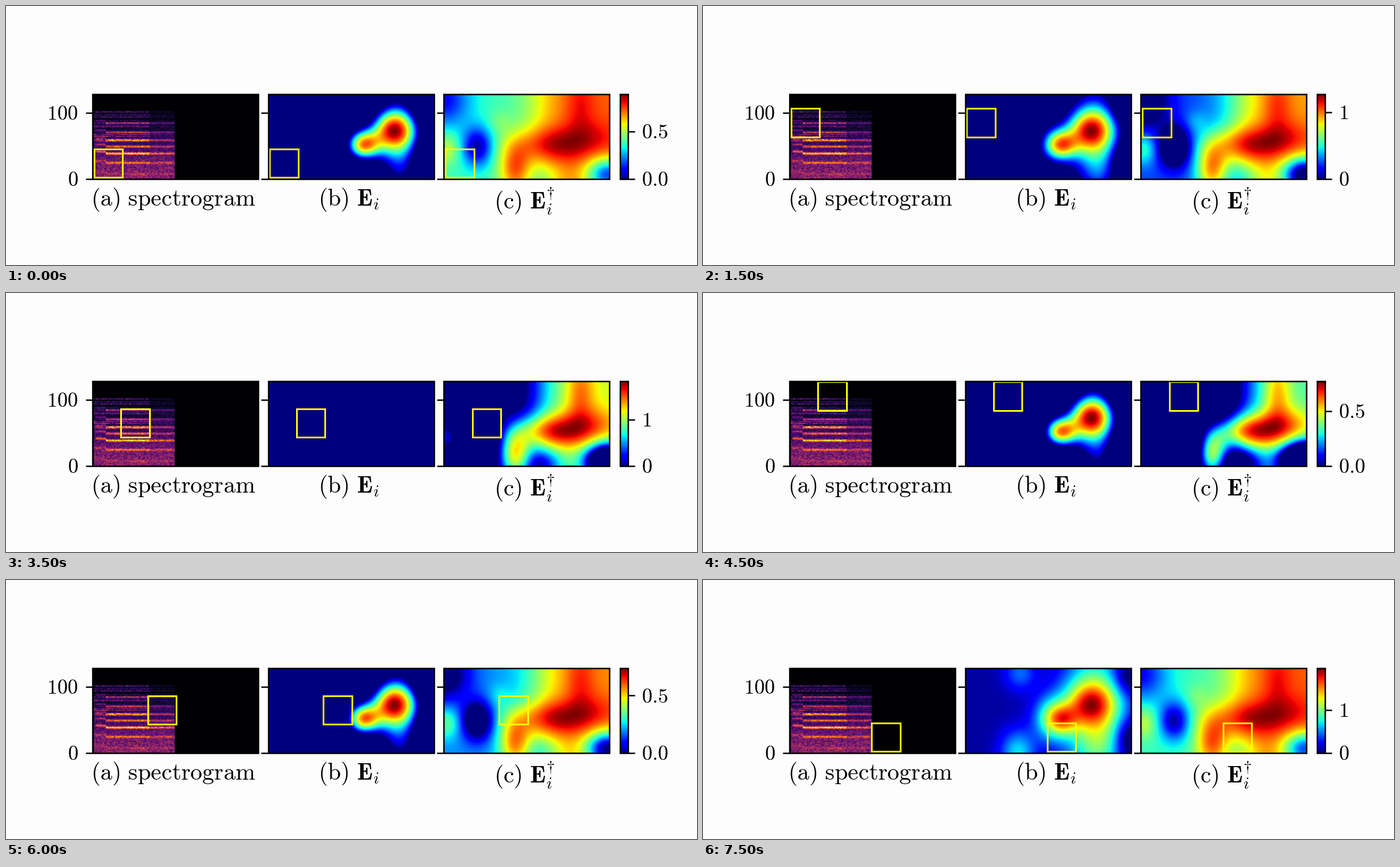
Recreate the animation shown at these times as a matplotlib script. Size 1222 by 458 pixels, loop 8000 ms.

```python
import matplotlib.pyplot as plt
import numpy as np
from matplotlib.animation import FuncAnimation
from matplotlib.patches import Rectangle

W, H, DPI = 1222, 458, 64
PT = 72 / DPI  # points per pixel
PW, PH = 293, 150
TOP, BOTTOM = 156, 306
LEFTS = [153 + 310.7 * i for i in range(3)]
BAR = (1085.5, 1100)
ROWS, STEPS = 5, 16
DROP = 12.4  # from tick to text baseline

plt.rcParams["mathtext.fontset"] = "cm"

# Key steps: step, colour bar maximum, cut-off in map b, cut-off in map c
KEYS = np.array([
    (0, .893, .5, 0), (3, 1.27, .36, .28), (4, .85, .5, .45), (5, .9, .5, 0),
    (7, 1.83, 1, .53), (8, .85, .52, .6), (9, .773, .52, .66),
    (11, .758, .5, 0), (14, .7, .5, .62), (15, 1.97, 0, 0),
]).T


def bumps(x, y, *specs):
    """Sum of Gaussian bumps (centre x, y, widths x, y, height)."""
    return sum(h * np.exp(-((x - cx) / sx) ** 2 / 2 - ((y - cy) / sy) ** 2 / 2)
               for cx, cy, sx, sy, h in specs)


def relevance():
    x, y = np.meshgrid(np.arange(PW), np.arange(PH))
    b = .03 + bumps(
        x, y,
        (228, 80, 40, 80, .55),    # wide halo
        (219, 62, 30, 26, .45),    # main lobe
        (171, 90, 19, 18, .4),     # second lobe
        (150, 88, 22, 28, .36),    # its left shoulder
        (238, 145, 22, 30, .08),
        (288, 125, 18, 25, -.25), (284, 15, 18, 22, -.2),
        (92, 148, 22, 28, .32), (96, 8, 20, 22, .2))
    c = .42 + .4 / (1 + np.exp((165 - x) / 22)) + bumps(
        x, y,
        (0, 10, 32, 34, -.3),      # cold corner
        (59, 92, 19, 24, -.4),     # cold spot
        (5, 96, 17, 20, .17),
        (125, 132, 20, 32, .36),   # lower ridge
        (180, 88, 50, 22, .24), (262, 74, 35, 22, .07),
        (175, 148, 26, 20, -.12), (289, 142, 27, 21, -.62),
        (240, 20, 18, 40, .1), (97, 48, 14, 14, .06))
    return [np.clip(f / f.max(), 0, 1) for f in (b, c)]


def spectrogram():
    rng = np.random.default_rng(4)
    r, c = np.arange(128)[:, None], np.arange(250)[None, :]
    noise = rng.random((128, 250))
    noise = (noise + np.roll(noise, 1, axis=1)) / 2
    img = .4 * np.exp(-(r / 62) ** 2) * (.35 + 1.1 * noise)
    img += .42 * rng.random((128, 1)) ** 3 * (r > 55) * noise * np.where(c < 86, 1.6, .5)
    harmonics = [(7, .15), (24, .42), (38, .75), (48.5, .55), (58, .48), (70, .4), (84, .3)]
    for start, end, shift, gain in [(4, 20, 3, .5), (20, 86, 0, 1), (86, 124, 0, .62)]:
        inside = (c >= start) & (c < end)
        for row, amp in harmonics:
            line = np.exp(-((r - row - shift) / 1.6) ** 2)
            img += gain * amp * line * inside * (.75 + .5 * noise)
    return np.clip(img, 0, 1) * (r < 104) * (c >= 2) * (c < 124)


def cut(field, t):
    return np.clip((field - t) / max(1 - t, 1e-6), 0, 1)


def picture(data, left, right, cmap, origin="upper"):
    return ax.imshow(data, cmap=cmap, vmin=0, vmax=1, origin=origin, aspect="auto",
                     extent=(left, right, BOTTOM, TOP), interpolation="bilinear")


def outline(x, y, w, h, color, lw, z):
    return ax.add_patch(Rectangle((x, y), w, h, fill=False, ec=color, lw=lw * PT, zorder=z))


def tick(x, y):
    return ax.plot([x, x + 12], [y, y], color="black", lw=2.5 * PT,
                   solid_capstyle="butt", zorder=5)[0]


def label(x, y, tex, size=36.5, ha="left"):
    return ax.text(x, y, f"${tex}$", fontsize=size * PT, ha=ha, va="baseline")


fig = plt.figure(figsize=(W / DPI, H / DPI), dpi=DPI, facecolor="#fdfdfd")
ax = fig.add_axes([0, 0, 1, 1])

fields = relevance()
picture(spectrogram(), LEFTS[0], LEFTS[0] + PW, "inferno", "lower")
maps = [picture(f, x, x + PW, "jet") for f, x in zip(fields, LEFTS[1:])]
picture(np.linspace(0, 1, 256)[:, None], *BAR, "jet", "lower")

boxes = []
for left in LEFTS:
    outline(left, TOP, PW, PH, "black", 2.6, 5)
    for y in (188.5, BOTTOM):
        tick(left - 12.5, y)
    boxes.append(outline(left, TOP, 50.5, 50.5, "yellow", 3, 4))
outline(BAR[0], TOP, BAR[1] - BAR[0], PH, "black", 2.6, 5)

label(127.5, 188.5 + DROP, "100", ha="right")
label(127.5, BOTTOM + DROP, "0", ha="right")
tick(BAR[1], BOTTOM)
zero = label(1123.5, BOTTOM + DROP, "0")
mark_tick = tick(BAR[1], TOP)
mark = label(1123.5, TOP, "1")

captions = [
    (150, 352.5, r"\mathrm{(a)\ spectrogram}"),
    (552, 352.5, r"\mathrm{(b)\ }\mathbf{E}_{i}"),
    (863, 358.7, r"\mathrm{(c)\ }\mathbf{E}^{\dagger}_{i}"),
]
for x, y, tex in captions:
    label(x, y, tex, 42)

ax.set_xlim(0, W)
ax.set_ylim(H, 0)
ax.axis("off")


def update(k):
    col, row = divmod(k, ROWS)
    for box, left in zip(boxes, LEFTS):
        box.set_xy((left + 2.7 + 47.5 * col, 252.7 - 23.9 * row))
    peak, *cuts = (np.interp(k, KEYS[0], values) for values in KEYS[1:])
    for img, field, t in zip(maps, fields, cuts):
        img.set_data(cut(field, t))
    value = 1 if peak > 1 else .5
    y = BOTTOM - PH * value / peak
    mark_tick.set_ydata([y, y])
    mark.set_y(y + DROP)
    mark.set_text(f"${value}$")
    zero.set_text("$0$" if value == 1 else "$0.0$")
    return boxes


anim = FuncAnimation(fig, update, frames=STEPS, interval=500,
                     repeat=True, repeat_delay=0, blit=False)
plt.show()
```
